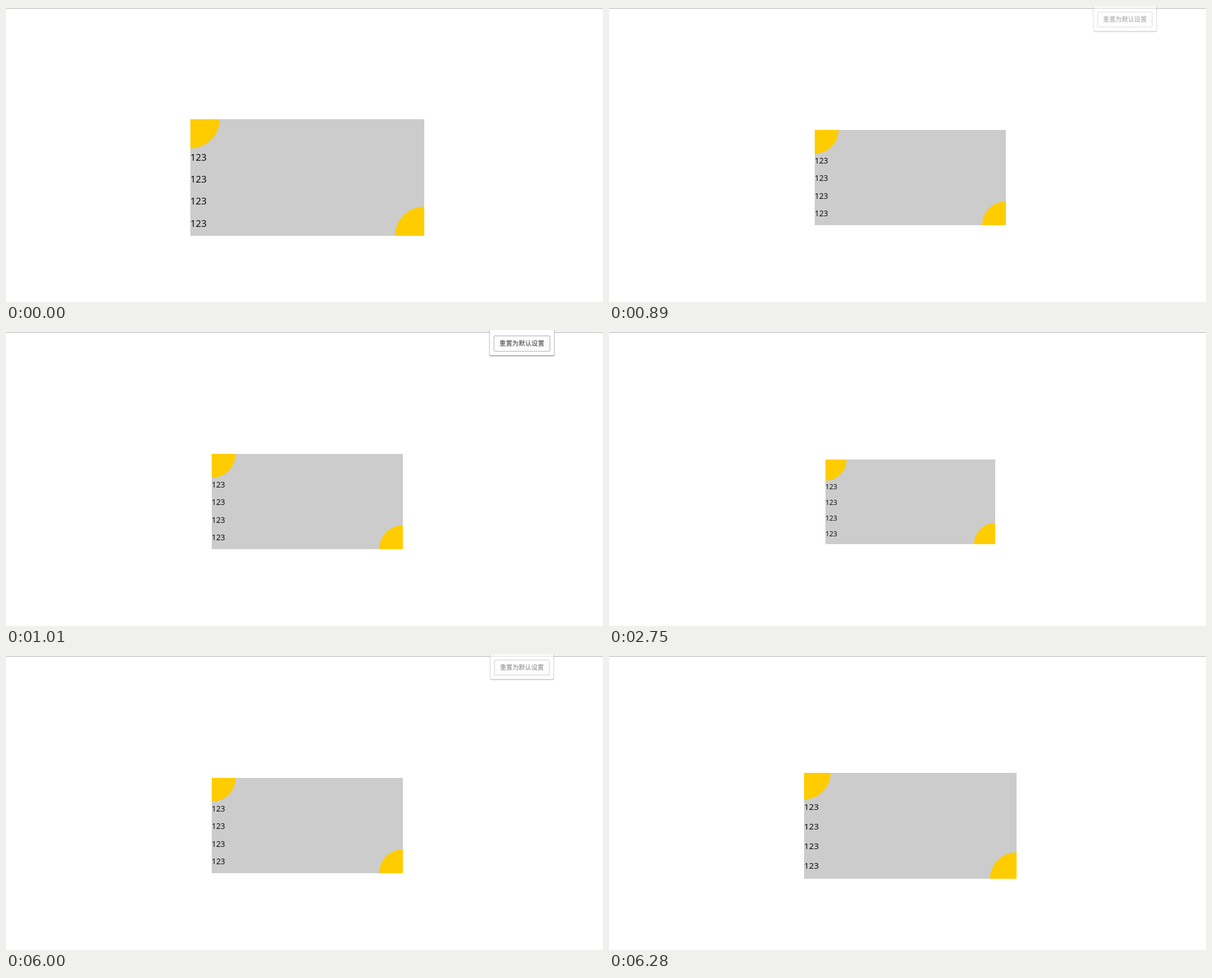
These frames come from a looping animation (1062 px wide and 528 px high, 8 s). An HTML page:

```html
<!DOCTYPE html>
<html lang="zh">
<head>
<meta charset="utf-8">
<style>
  html, body { margin: 0; width: 100%; height: 100%; overflow: hidden; background: #fff; }
  svg { display: block; width: 1062px; height: 528px; }
  #card text { font-family: "Open Sans", "Noto Sans", sans-serif; fill: #000; }
  #popup text { font: 11.4px "Noto Sans CJK SC", "Noto Sans CJK", sans-serif; fill: #333; text-anchor: middle; }
</style>
</head>
<body>
<svg viewBox="0 0 1062 528">
  <rect width="1062" height="4" fill="#f2f2f2"/>
  <rect y="4" width="1062" height="1" fill="#b4b4b4"/>
  <g id="card"></g>
  <g id="popup">
    <rect x="860" y="-8" width="116" height="55" rx="3" fill="#a8a8a8"/>
    <rect x="860" y="-8" width="115.5" height="53.5" rx="2.5" fill="#fff" stroke="#b4b4b4"/>
    <rect x="868" y="10.5" width="99.5" height="27.5" rx="1.5" fill="#fcfcfc" stroke="#aaa"/>
    <text x="917.7" y="28.2">重置为默认设置</text>
  </g>
</svg>
<script>
const LOOP = 8000;

// Card layout per zoom level; text gives first baseline and line step
const ZOOM = {
  110: { x: 328, y: 202, w: 416, h: 208, size: 16.8, text: [275.6, 39.3] },
  100: { x: 347, y: 212, w: 378, h: 189, size: 15.3, text: [277.8, 35] },
  90:  { x: 366, y: 221, w: 340, h: 170, size: 13.8, text: [280.6, 31.5] },
  80:  { x: 385, y: 231, w: 302, h: 151, size: 12.2, text: [284, 28.1] },
};

// [start ms, zoom, popup opacity, popup scale]
const STEPS = [
  [0, 110, 0, 1],
  [500, 100, 0, 1],
  [890, 90, 0.45, 0.975],
  [1010, 90, 1, 1],
  [1270, 80, 1, 1],
  [2750, 80, 0, 1],
  [6000, 90, 0.6, 0.98],
  [6130, 90, 1, 1],
  [6280, 100, 0, 1],
];

const card = document.getElementById('card');
const popup = document.getElementById('popup');

function cardMarkup({ x, y, w, h, size, text: [first, step] }) {
  const r = w / 8, right = x + w, bottom = y + h;
  const corner = (cx, cy, d) =>
    `<path fill="#fc0" d="M${cx} ${cy}h${d}A${r} ${r} 0 0 1 ${cx} ${cy + d}z"/>`;
  const lines = [0, 1, 2, 3].map(i =>
    `<text x="${x}" y="${Math.round(first + i * step)}" font-size="${size}">123</text>`);
  return `<rect x="${x}" y="${y}" width="${w}" height="${h}" fill="#ccc"/>` +
    corner(x, y, r) + corner(right, bottom, -r) + lines.join('');
}

let current;
function draw(now) {
  const t = now % LOOP;
  const step = STEPS.findLast(([start]) => start <= t);
  if (step !== current) {
    current = step;
    const [, zoom, opacity, scale] = step;
    card.innerHTML = cardMarkup(ZOOM[zoom]);
    popup.setAttribute('opacity', opacity);
    popup.setAttribute('transform', `translate(918 22) scale(${scale}) translate(-918 -22)`);
  }
}

const begin = performance.now();
function tick() {
  draw(performance.now() - begin);
  requestAnimationFrame(tick);
}
tick();
</script>
</body>
</html>
```
